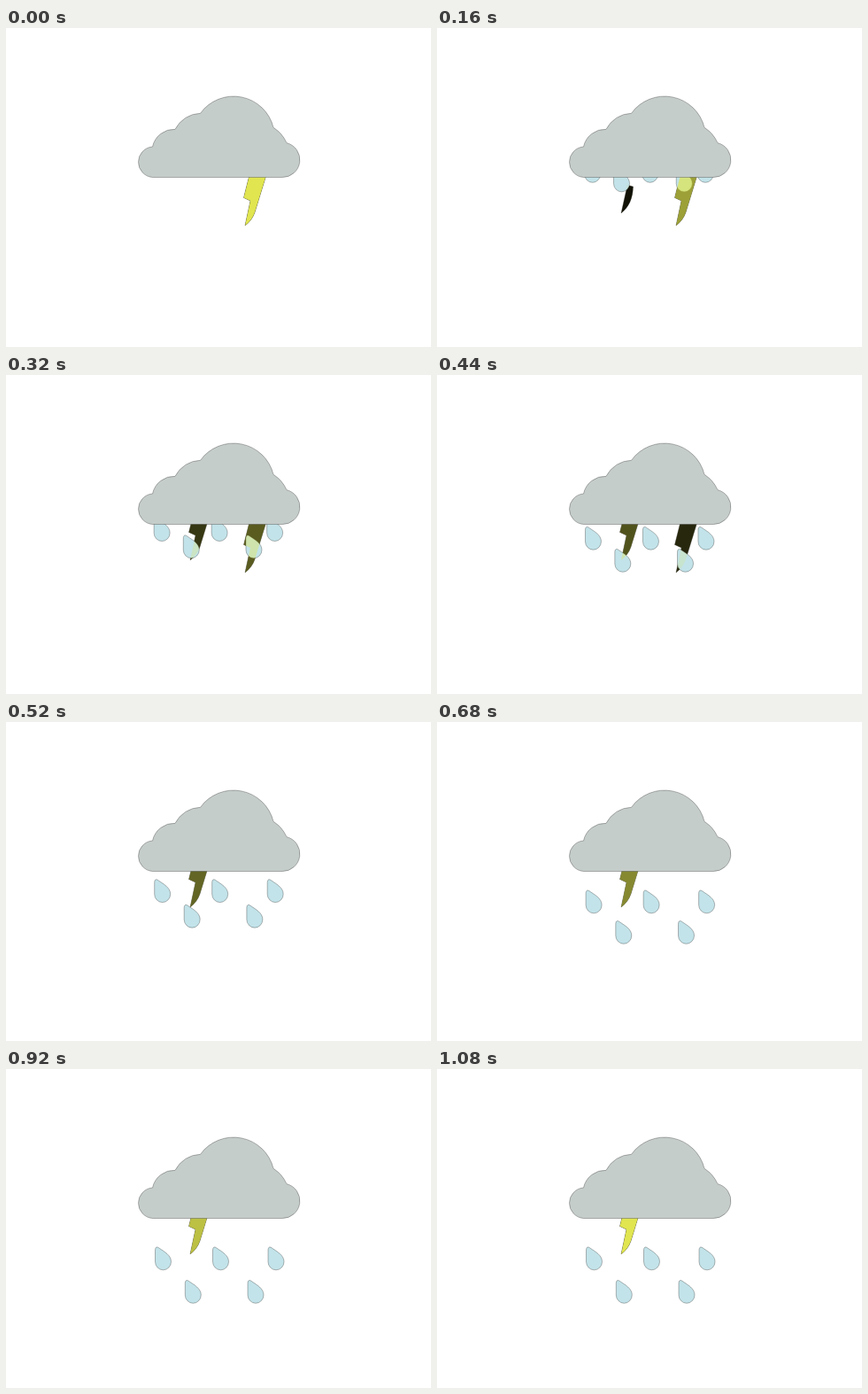
These frames come from a looping animation (480 by 360 pixels, 1.44 s). An HTML page:

```html
<!DOCTYPE html>
<html lang="en">
<head>
<meta charset="utf-8">
<title>Storm cloud</title>
<style>
  html, body { margin: 0; width: 100%; height: 100%; overflow: hidden; background: #fff; }
  svg { display: block; width: 100%; height: 100%; }
  path { stroke: #222; stroke-width: .5; stroke-opacity: .65; }
  .drop { fill: #c2e3e9; }
  .shade { fill: #000; }
  .glow { fill: #e0e550; stroke: none; }
  .cloud { fill: #c5cdca; }
</style>
</head>
<body>
<svg viewBox="0 0 480 360">
  <g id="shades"></g>
  <g id="drops"></g>
  <g id="glows"></g>
  <path class="cloud" d="M165.5 168.5A17.3 17.3 0 0 1 165.5 134A25 25 0 0 1 191 114.3A33 33 0 0 1 219.5 96.3A46.3 46.3 0 0 1 302 112.3A40 40 0 0 1 317 129.7A19.7 19.7 0 0 1 312 168.5Z"/>
</svg>
<script>
const LOOP = 1440, STEP = 40;
const BOLT = 'M279 150L268.5 191.5L276 195L270 223Q278 217 281 208L293 169L297 150Z';
const BOLT_TIP = 'M276 191L283.5 193Q283 213 270 223L276 196Z';
const DROP = 'M-9 -22C-9 -26.5 -7 -27 -4 -24.5C1 -21 9 -17 9 -9.5A9 9.3 0 0 1 -9 -9.5Z';

function addPath(parent, cls, d) {
  const path = document.createElementNS('http://www.w3.org/2000/svg', 'path');
  path.setAttribute('class', cls);
  path.setAttribute('d', d);
  return document.getElementById(parent).appendChild(path);
}

const move = (el, x, y) => el.setAttribute('transform', `translate(${x} ${y})`);
const clamp = v => Math.min(1, Math.max(0, v));

// Landing point, distance left at 680 ms, and easing power of each drop
const back = { y: 227, rest: 11, power: 1.08 };
const front = { y: 264.5, rest: 14, power: 1.2 };
const drops = [
  [177.5, back], [242.5, back], [305, back], [211.3, front], [282, front]
].map(([x, row]) => ({ x, ...row, el: addPath('drops', 'drop', DROP) }));

const bolts = [
  { x: 0, y: 0, alpha: t => 1 - t / 530 },
  { x: -62, y: -14, alpha: t => (t - 80) / 1000 }
].map(b => {
  b.shade = addPath('shades', 'shade', BOLT);
  b.glow = addPath('glows', 'glow', BOLT);
  move(b.shade, b.x, b.y);
  move(b.glow, b.x, b.y);
  return b;
});

function draw(t) {
  for (const d of drops) {
    const left = d.rest * Math.pow(Math.max(0, 840 - t) / 160, d.power);
    move(d.el, d.x - left * 0.035, d.y - left);
  }
  // A black bolt lies behind the drops, its yellow light in front of them
  for (const b of bolts) {
    const a = clamp(b.alpha(t));
    const shape = a < 0.1 ? BOLT_TIP : BOLT;
    b.shade.setAttribute('d', shape);
    b.glow.setAttribute('d', shape);
    b.shade.setAttribute('visibility', a < 0.04 ? 'hidden' : 'visible');
    b.glow.setAttribute('opacity', a < 0.04 ? 0 : a);
  }
}

const start = performance.now();
function tick() {
  const t = (performance.now() - start) % LOOP;
  draw(Math.floor(t / STEP) * STEP);
  requestAnimationFrame(tick);
}
tick();
</script>
</body>
</html>
```
